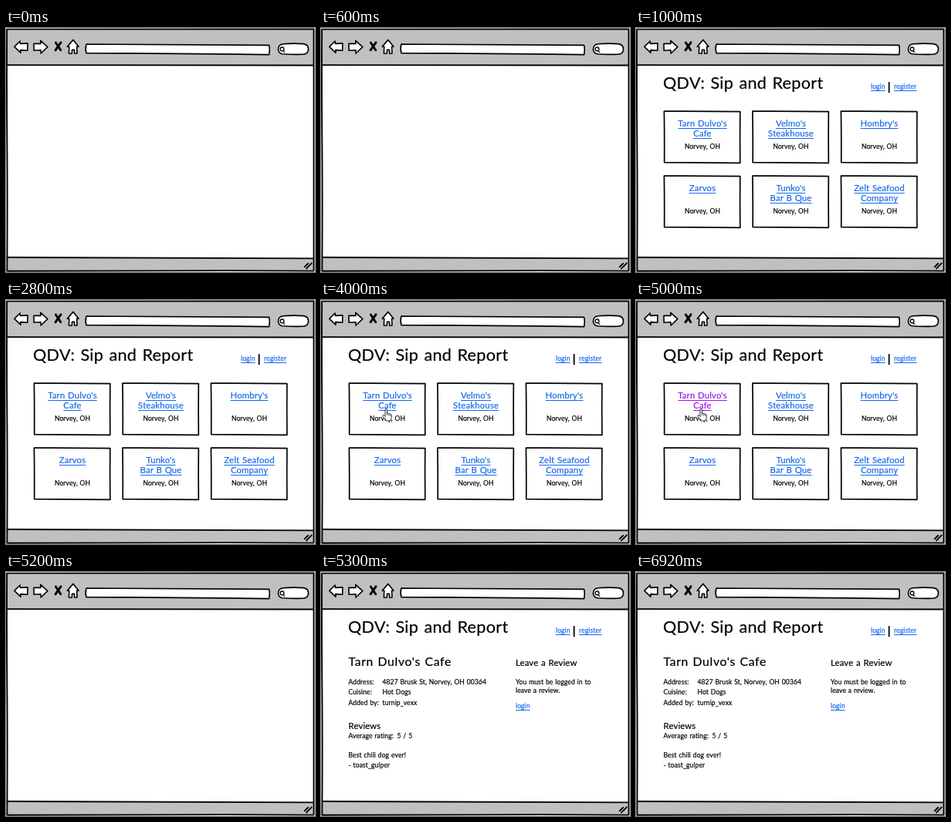
Recreate the animation shown at these times as an HTML page. Size 400x317 px, loop 8000 ms.

```html
<!DOCTYPE html>
<html lang="en">
<head>
<meta charset="utf-8">
<title>Wireframe walkthrough</title>
<style>
  html, body { margin: 0; width: 100%; height: 100%; overflow: hidden; background: #fff; }
  svg { display: block; width: 400px; height: 317px; color: #000; }
  text {
    font-family: Lato, "Open Sans", sans-serif; font-size: 8.5px;
    letter-spacing: .015em; word-spacing: .06em; white-space: pre;
    fill: currentColor; stroke: currentColor; stroke-width: .2px;
  }
  .ink { stroke: #000; stroke-linejoin: round; stroke-linecap: round; }
  .title { font-size: 21.6px; }
  .head { font-size: 15.8px; letter-spacing: .04em; }
  .mid { font-size: 11.3px; }
  .link { color: #1669ec; }
  .link rect { fill: currentColor; }
  .visited { color: #9818f0; }
</style>
</head>
<body>
<svg id="stage" viewBox="0 0 400 317">
  <g id="browser" class="ink" stroke-width="1.6" fill="#fff">
    <path fill="#c0c0c0" stroke="none" d="M1 1H398V48.4H1Z M1 298L398 299.4V315H1Z"/>
    <path fill="none" stroke-width="1.9" d="M1.2 1.6Q200 .8 398.4 1.4Q397.8 150 398.4 315.6Q300 314.8 200 315.4T1.4 315.8Q2 220 1.4 150T1.2 1.6Z"/>
    <path fill="none" stroke-width="1.8" d="M1.5 48.2Q200 48 398 48.5M1.5 298Q200 298.4 398 299.4"/>
    <path d="M10.8 24.4L18.2 17L18.4 20.4L28 19.9L27.8 29.2L18.9 28.6L19 32.2Z"/>
    <path d="M36 20.2L45 20.4L44.8 16.4L53.8 24.6L45.2 33L45 28.8L36.2 29.2Z"/>
    <path fill="none" stroke-width="2.9" d="M64.4 19L70.8 28.8M71 18.8L64 28.8"/>
    <path d="M87 15.4L94 24.2L91.6 24.4L92 33L88.8 33.2L88.4 28.2L85.6 28.2L85.2 33.2L81.4 33L81.8 24.4L79.2 24.2Z"/>
    <path d="M104 21Q220 21.2 340.6 22.4Q342 28 340.6 34.6Q220 33 104 32.6Q102.2 27 104 21Z"/>
    <path d="M358.4 20.8Q372 19.6 385 20.6Q391.6 21.4 391.4 28Q391.2 34 384 34.2Q370 34.8 358.4 33.8Q352.4 33 352.4 27.4Q352.8 21.6 358.4 20.8Z"/>
    <path fill="none" stroke-width="1.3" d="M355 27.4A2.4 2.4 0 1 0 359.8 27.4A2.4 2.4 0 1 0 355 27.4M358.8 29.6L360.6 31.4"/>
    <path fill="none" stroke-width="1.9" d="M386.6 310.4L391 306M388.8 312.6L395.6 305.6"/>
  </g>
  <g id="shared"></g>
  <g id="list"></g>
  <g id="detail"></g>
  <g id="cursor" class="ink" fill="#fff" stroke-width=".8">
    <path d="M83 151V143Q83 141.4 84.2 141.4T85.4 143V147.2Q87.2 146.2 87.7 147.8Q89.2 147 89.8 148.6Q91.2 148.2 91.2 149.8V152.8Q91 155 89.8 157H84.6Q83.6 154.8 80.2 151.4Q79.4 149.8 80.4 149.4Q81.6 149.2 83 151Z"/>
    <path fill="none" stroke-width=".6" d="M85.4 147.2V149.8M87.7 147.8V150.2M89.8 148.6V150.6"/>
  </g>
</svg>
<script>
const NS = "http://www.w3.org/2000/svg";
const byId = id => document.getElementById(id);

function add(parent, tag, attrs, content) {
  const el = document.createElementNS(NS, tag);
  for (const key in attrs) el.setAttribute(key, attrs[key]);
  if (content) el.textContent = content;
  parent.append(el);
  return el;
}

const write = (parent, x, y, words, style = "") =>
  add(parent, "text", { x, y, class: style }, words);

// Text with a crisp one pixel underline
function link(parent, x, y, words, style = "", centred = false) {
  const g = add(parent, "g", { class: "link" });
  const text = write(g, x, y, words, style);
  const width = text.getComputedTextLength();
  const left = centred ? x - width / 2 : x;
  text.setAttribute("x", left);
  add(g, "rect", { x: left, y: y + 2, width, height: 1 });
  return g;
}

function card(x, y, names) {
  const list = byId("list");
  const [l, r, b] = [x + .4, x + 98.8, y + 67];
  add(list, "path", {
    class: "ink", fill: "#fff", "stroke-width": 1.7,
    d: `M${l} ${y + .2}Q${x + 50} ${y} ${r} ${y + .6}Q${r - .4} ${y + 34} ${r} ${b + .3}` +
       `Q${x + 50} ${b} ${l + .3} ${b - .4}Q${l + .5} ${y + 30} ${l} ${y + .2}Z`
  });
  const mid = x + 50;
  const links = names.map((name, i) => link(list, mid, y + 20 + 13 * i, name, "mid", true));
  write(list, mid, y + 49, "Norvey, OH").setAttribute("text-anchor", "middle");
  return links;
}

const shared = byId("shared");
write(shared, 35, 79, "QDV: Sip and Report", "title");
link(shared, 304, 79, "login");
link(shared, 334, 79, "register");
add(shared, "path", { class: "ink", "stroke-width": 1.8, d: "M327.6 71V83.4" });

const cards = [
  ["Tarn Dulvo's", "Cafe"], ["Velmo's", "Steakhouse"], ["Hombry's"],
  ["Zarvos"], ["Tunko's", "Bar B Que"], ["Zelt Seafood", "Company"]
].map((names, i) => card(36 + 114.5 * (i % 3), i < 3 ? 108 : 192, names));

const detail = byId("detail");
[
  [35.5, 122, "Tarn Dulvo's Cafe", "head"],
  [35.5, 146, "Address:"], [79.5, 146, "4827 Brusk St, Norvey, OH 00364"],
  [35.5, 159, "Cuisine:"], [79.5, 159, "Hot Dogs"],
  [35.5, 173, "Added by:"], [79.5, 173, "turnip_vexx"],
  [35.5, 204, "Reviews", "mid"],
  [35.5, 216, "Average rating:"], [98.5, 216, "5 / 5"],
  [35.5, 241, "Best chili dog ever!"], [35.5, 254, "- toast_gulper"],
  [252, 122, "Leave a Review", "mid"],
  [252, 146, "You must be logged in to"], [252, 157, "leave a review."]
].forEach(row => write(detail, ...row));
link(detail, 252, 177, "login");

const LOOP = 8000;
const steps = [
  { at: 0, show: [] },
  { at: 1000, show: ["shared", "list"] },
  { at: 4000, show: ["shared", "list", "cursor"] },
  { at: 5000, show: ["shared", "list", "cursor"], visited: true },
  { at: 5200, show: [] },
  { at: 5300, show: ["shared", "detail"] }
];

function render() {
  const t = performance.now() % LOOP;
  const step = steps.filter(s => s.at <= t).pop();
  for (const id of ["shared", "list", "detail", "cursor"])
    byId(id).style.visibility = step.show.includes(id) ? "visible" : "hidden";
  for (const el of cards[0]) el.classList.toggle("visited", !!step.visited);
  requestAnimationFrame(render);
}
render();
</script>
</body>
</html>
```
